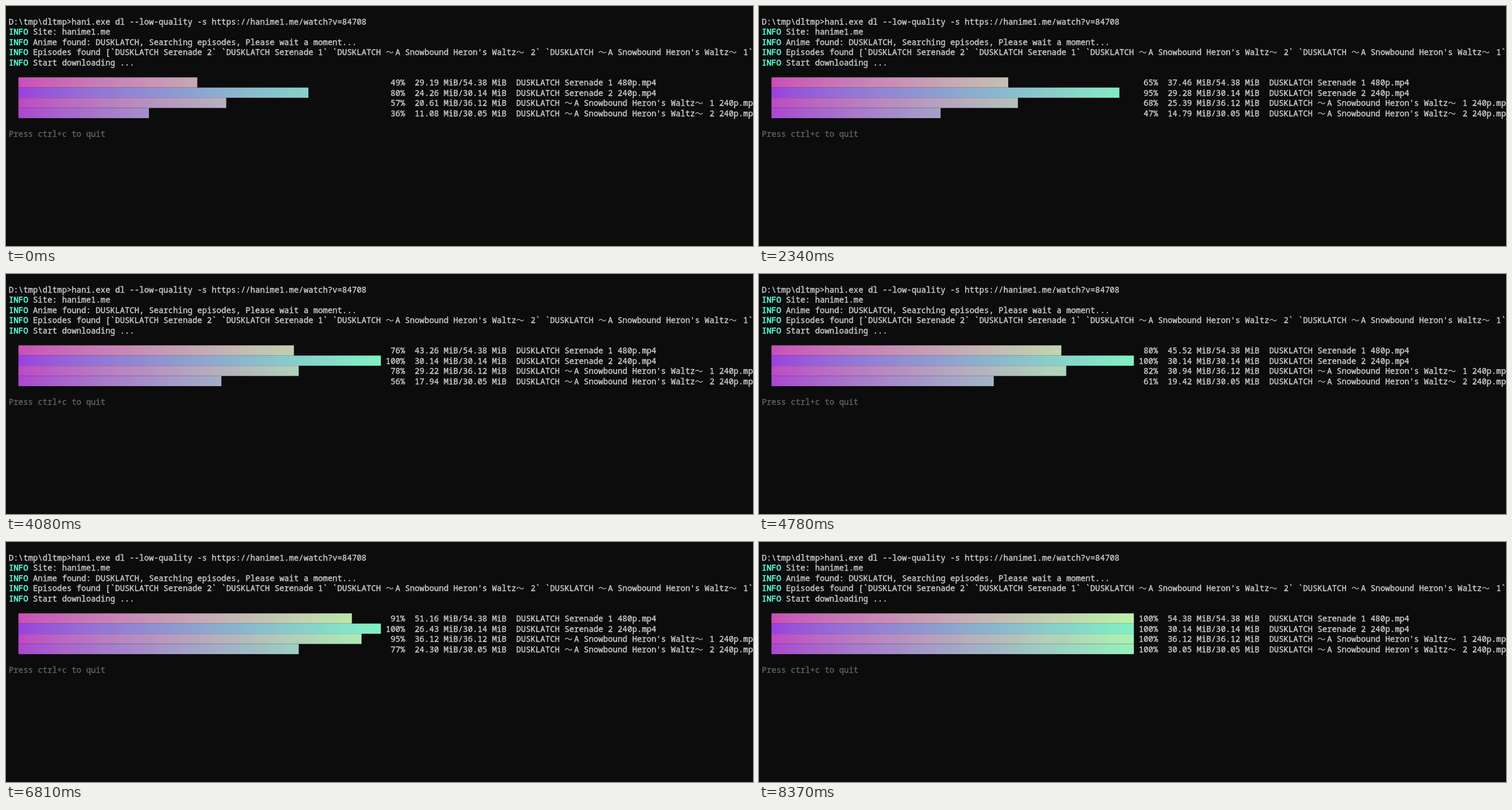
An HTML page with a canvas for the animation above (9160 ms loop, 1280 px wide and 411 px high).

```html
<!DOCTYPE html>
<html lang="en">
<head>
<meta charset="utf-8">
<title>Terminal download</title>
<style>
  html, body { margin: 0; width: 100%; height: 100%; overflow: hidden; background: #0c0c0c; }
  canvas { display: block; }
</style>
</head>
<body>
<canvas id="term" width="1280" height="411"></canvas>
<script>
const ctx = document.getElementById('term').getContext('2d');
const LOOP = 9160, FIRST = 160, STEP = 144.375, END = 8370;
const CELL = 8.28, LINE = 17.46, LEFT = 4.8, BASE = 14.2;
const BAR_COL = 2, BAR_CELLS = 75, FIRST_ROW = 7;
const BG = '#0c0c0c', FG = '#cccccc', INFO = '#5fffd7', DIM = '#626262';
const MONO = '500 13.8px "Noto Sans Mono", "DejaVu Sans Mono", monospace';
const WIDE = '13.8px "Noto Sans CJK JP", "Noto Sans CJK", sans-serif';

const SHOW = 'DUSKLATCH';
const PART_A = SHOW + ' Serenade';
const PART_B = SHOW + ' ～A Snowbound Heron\'s Waltz～';

const LOG = [
  'Site: hanime1.me',
  `Anime found: ${SHOW}, Searching episodes, Please wait a moment...`,
  `Episodes found [\`${PART_A} 2\` \`${PART_A} 1\` \`${PART_B} 2\` \`${PART_B} 1\`]`,
  'Start downloading ...'
];

// mib and pct grow along a cubic: [start, speed per second, bend]
const JOBS = [
  { file: PART_A + ' 1 480p.mp4', size: 54.38, hue: 0.375, mib: [29.19, 3.6, -0.008], pct: [49, 6.9, -0.0145] },
  { file: PART_A + ' 2 240p.mp4', size: 30.14, hue: 0.75, mib: [24.26, 2.4, -0.045], pct: [80, 5, 0.3] },
  { file: PART_B + ' 1 240p.mp4', size: 36.12, hue: 0.5, mib: [20.61, 2.02, 0.0062], pct: [57, 4.8, 0.0165] },
  { file: PART_B + ' 2 240p.mp4', size: 30.05, hue: 0.625, mib: [11.08, 1.55, 0.0085], pct: [36, 4.4, 0.036] }
];

// CIE Luv blending
const UN = 0.19784, VN = 0.46834;
const mix = (a, b, t) => a.map((v, i) => v + (b[i] - v) * t);

function toLuv(hex) {
  const [r, g, b] = [16, 8, 0].map(s => {
    const c = (hex >> s & 255) / 255;
    return c <= 0.04045 ? c / 12.92 : ((c + 0.055) / 1.055) ** 2.4;
  });
  const x = 0.4124 * r + 0.3576 * g + 0.1805 * b;
  const y = 0.2126 * r + 0.7152 * g + 0.0722 * b;
  const z = 0.0193 * r + 0.1192 * g + 0.9505 * b;
  const d = x + 15 * y + 3 * z, l = 116 * Math.cbrt(y) - 16;
  return [l, 13 * l * (4 * x / d - UN), 13 * l * (9 * y / d - VN)];
}

function toCss([l, u, v]) {
  const up = u / (13 * l) + UN, vp = v / (13 * l) + VN;
  const y = ((l + 16) / 116) ** 3;
  const x = y * 9 * up / (4 * vp), z = y * (12 - 3 * up - 20 * vp) / (4 * vp);
  const rgb = [
    3.2406 * x - 1.5372 * y - 0.4986 * z,
    -0.9689 * x + 1.8758 * y + 0.0415 * z,
    0.0557 * x - 0.204 * y + 1.057 * z
  ].map(c => {
    c = Math.min(1, Math.max(0, c));
    return Math.round(255 * (c <= 0.0031308 ? 12.92 * c : 1.055 * c ** (1 / 2.4) - 0.055));
  });
  return `rgb(${rgb})`;
}

const [TOP_L, TOP_R, LOW_L, LOW_R] = [0xf25d94, 0xe4f584, 0x643aff, 0x30f1d3].map(toLuv);
for (const job of JOBS) {
  const from = mix(TOP_L, LOW_L, job.hue), to = mix(TOP_R, LOW_R, job.hue);
  job.colors = Array.from({ length: BAR_CELLS }, (_, i) => toCss(mix(from, to, i / BAR_CELLS)));
}

const colX = col => LEFT + col * CELL;

// Places each character on the terminal grid; the wide tilde takes two cells.
function print(text, col, row, color = FG, heft = 0.4) {
  const y = row * LINE + BASE;
  ctx.fillStyle = ctx.strokeStyle = color;
  ctx.lineWidth = heft;
  ctx.lineJoin = 'round';
  for (const ch of text) {
    const wide = ch === '～', x = colX(col);
    ctx.font = wide ? WIDE : MONO;
    ctx.fillText(ch, x, y);
    if (!wide) ctx.strokeText(ch, x, y);
    col += wide ? 2 : 1;
  }
}

// Value at time t, held at max once reached or when everything is done
function grow([start, speed, bend], t, max) {
  const s = t / 1000;
  return t >= END ? max : Math.min(max, start + speed * s + bend * s ** 3);
}

function drawJob(job, row, t) {
  const pct = grow(job.pct, t, 100), mib = grow(job.mib, t, job.size);
  const filled = Math.round(pct / 100 * BAR_CELLS), right = colX(BAR_COL + filled);
  // Each cell is painted through to the right end, so no seams show.
  for (let i = 0; i < filled; i++) {
    const x = i ? Math.round(colX(BAR_COL + i)) : colX(BAR_COL);
    ctx.fillStyle = job.colors[i];
    const end = i < filled - 1 ? Math.round(colX(BAR_COL + i + 1)) : right;
    ctx.fillRect(x, row * LINE, end - x, LINE);
  }
  const label = `${pct.toFixed(0).padStart(3)}%  ${mib.toFixed(2)} MiB/${job.size.toFixed(2)} MiB  ${job.file}`;
  print(label, BAR_COL + BAR_CELLS + 1, row);
}

function draw(t) {
  ctx.fillStyle = BG;
  ctx.fillRect(0, 0, 1280, 411);
  print('D:\\tmp\\dltmp>hani.exe dl --low-quality -s https://hanime1.me/watch?v=84708', 0, 1);
  LOG.forEach((line, i) => {
    print('INFO', 0, i + 2, INFO, 0.6);
    print(line, 5, i + 2);
  });
  JOBS.forEach((job, i) => drawJob(job, FIRST_ROW + i, t));
  print('Press ctrl+c to quit', 0, 12, DIM);
}

// The screen refreshes at a steady beat, then rests on the finished state.
function tick(t) {
  if (t < FIRST) return 0;
  if (t >= END) return END;
  return FIRST + Math.floor((t - FIRST) / STEP) * STEP;
}

const start = performance.now();
function frame() {
  draw(tick((performance.now() - start) % LOOP));
  requestAnimationFrame(frame);
}
frame();
</script>
</body>
</html>
```
